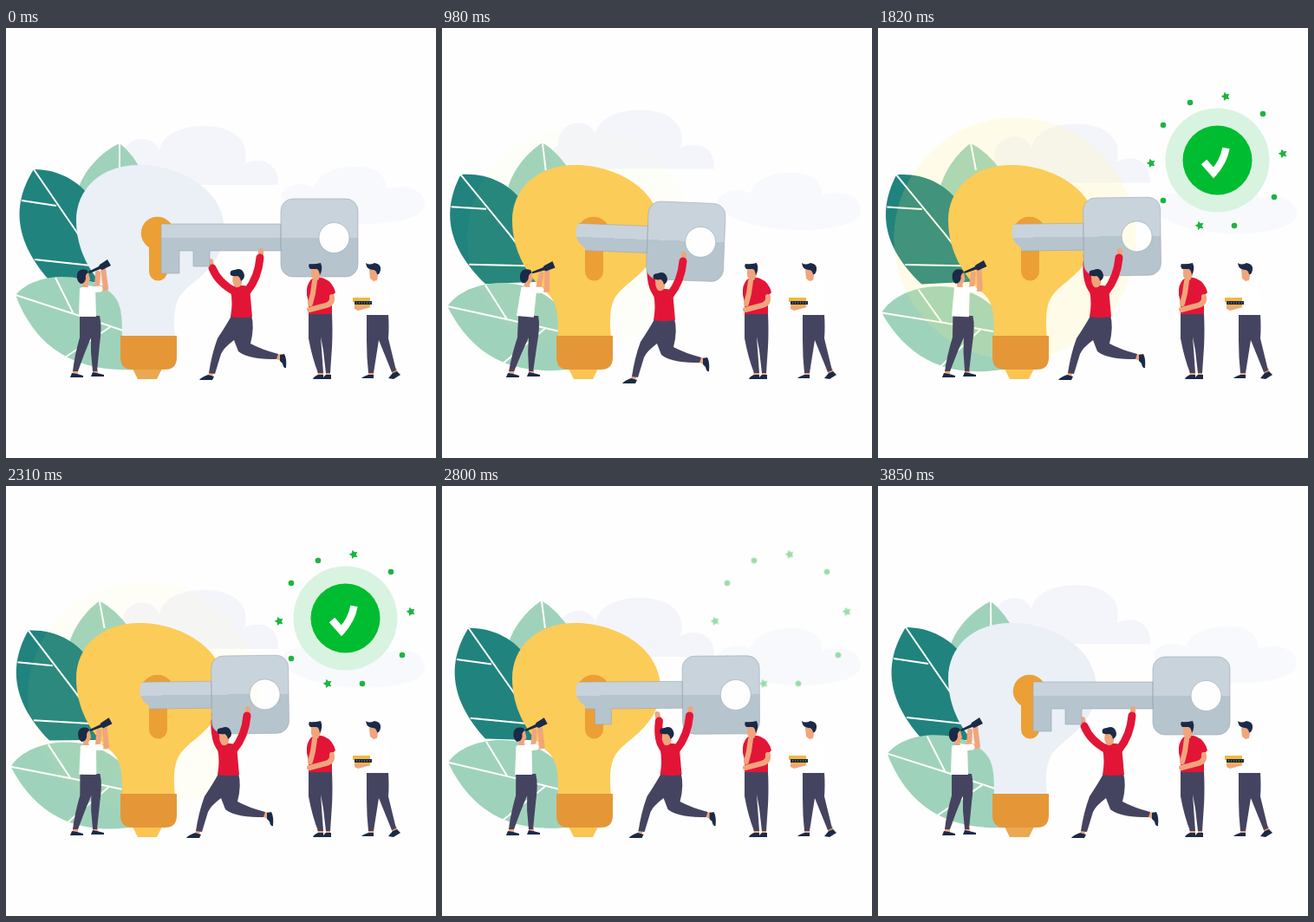
Recreate the animation shown at these times as an HTML page. Size 496 by 496 pixels, loop 3920 ms.

```html
<!DOCTYPE html>
<html lang="en">
<head>
<meta charset="utf-8">
<title>Key to the idea</title>
<style>
  html, body { margin: 0; width: 100%; height: 100%; overflow: hidden; background: #fefefe; }
  svg { display: block; width: 100vw; height: 100vh; }
  .skin { fill: #f0a57c; }
  .dark { fill: #1b2a47; }
  .pants { fill: #454460; }
  .red { fill: #e31536; }
  .white { fill: #fff; }
  .light { fill: #9fd2bb; }
  .teal { fill: #21837d; }
  .line { fill: none; stroke-linecap: round; stroke-linejoin: round; }
  .rib { fill: none; stroke: #fff; stroke-width: 2; }
  .sleeve { stroke: #e31536; stroke-width: 9; }
  .arm { stroke: #f0a57c; stroke-width: 6; }
</style>
</head>
<body>
<svg viewBox="0 0 496 496">
  <defs>
    <linearGradient id="steel" gradientUnits="userSpaceOnUse" x1="0" y1="197" x2="0" y2="287">
      <stop offset=".495" stop-color="#c9d3dc"/>
      <stop offset=".495" stop-color="#b6c4ce"/>
    </linearGradient>
    <clipPath id="slot"><path d="M175 217A19 19 0 0 0 165 253V400H500V100H175Z"/></clipPath>
  </defs>

  <path id="cloudL" fill="#f4f5fb" d="M314 181C315 165 305 153 292 153Q281 153 275 157C283 130 262 113 228 113C200 113 180 124 177 141C172 129 160 126 150 129C138 133 134 142 134 154Q122 160 122 181Z"/>
  <path id="cloudR" fill="#f8f9fc" d="M317 192C325 178 345 178 355 184C362 165 385 160 405 160C428 160 440 172 438 186C465 178 483 188 483 204C483 218 450 226 415 226C370 226 322 215 317 192Z"/>

  <g id="leafTop">
    <path class="light" d="M131 133C110 143 88 165 82 190L85 260H160V172Q148 146 131 133Z"/>
    <path class="rib" d="M131 133V165"/>
  </g>
  <g id="leafDark">
    <path class="teal" d="M32 163C62 163 85 178 97 195L130 240L125 294L50 291C5 240 10 198 32 163Z"/>
    <path class="rib" d="M32 163L82 236L105 272M18 199L58 205M33 267L98 274"/>
  </g>
  <g id="leafLow">
    <path class="light" d="M11 308C30 285 75 280 110 297Q145 315 160 360L150 394C100 396 40 385 11 308Z"/>
    <path class="rib" d="M11 308L82 331L135 349M57 288L78 330M120 345L68 380"/>
  </g>
  <circle id="glow" cx="158" cy="243" fill="#ffee70"/>

  <path id="bulb" d="M154 158C200 158 252 186 252 233C252 272 218 290 205 304C193 316 193 334 195 356H134C134 328 133 315 119 304C98 285 81 256 81 222C81 186 109 158 154 158Z"/>
  <path id="tip" d="M146 393H180L174 405H152Z"/>
  <path fill="#e59738" d="M132 355H197V380Q197 394 183 394H146Q132 394 132 380Z"/>
  <path fill="#ec9f35" d="M165 253A19 19 0 1 1 186 252V281a10.500 10.500 0 0 1-21 0Z"/>

  <g id="badge">
    <circle r="60" fill="#d9f3e1"/>
    <circle r="40" fill="#00bc30"/>
    <path fill="none" stroke="#fff" stroke-width="8.500" d="M-15.500 2L-4.500 14.500Q7 2 10-14"/>
  </g>
  <g id="sparks" fill="#1cb540"></g>

  <g id="armBack">
    <path id="hand" class="line arm"/>
    <path id="sleeve" class="line sleeve"/>
  </g>
  <g clip-path="url(#slot)">
    <path id="key" fill="url(#steel)" fill-rule="evenodd" stroke="#9da6b1" stroke-width=".6"
      d="M179 226H317V257H235V275H216V257H200V283H179ZM331 197H392a14 14 0 0 1 14 14V273a14 14 0 0 1-14 14H331a14 14 0 0 1-14-14V211a14 14 0 0 1 14-14ZM396 242a17.500 17.500 0 1 0-35 0a17.500 17.500 0 1 0 35 0Z"/>
  </g>

  <g id="carrier">
    <path class="skin" d="M234 397L239 398L238 403H233ZM311 377L318 376L317 384L312 382Z"/>
    <path class="pants" d="M260 332L283 331Q287 345 282 364Q295 371 314 376L312 382C295 382 278 381 268 373L263 360Q251 369 248 376L241 399L234 398C236 385 239 371 244 358Q254 343 260 332Z"/>
    <path class="dark" d="M233 400L240 402L238 406H223Q225 403 233 400ZM316 377L321 376Q324 381 323 392Q320 393 319 387L316 384Z"/>
    <path class="line arm" d="M294 268V257"/>
    <path class="line sleeve" d="M278 304Q291 288 293 265"/>
    <path class="red" d="M262 298Q272 295 281 299L284 333Q272 335 259 333Q262 317 259 303Z"/>
    <path class="skin" d="M262 285L271 284Q274 294 270 298Q265 301 263 297Q260 292 262 285Z"/>
    <path class="dark" d="M259 285Q257 279 264 279Q271 276 274 282Q277 288 271 292Q270 287 267 286Q262 287 259 285Z"/>
  </g>

  <g id="scout">
    <path class="skin" d="M77 394H83V400H77ZM100 394H106V400H100Z"/>
    <path class="pants" d="M85 332H108Q111 344 108 365L105 396H100L98 374L98 357Q90 376 83 396H77Q79 378 85 357Z"/>
    <g id="scoutTop">
      <path class="white" d="M85 300Q95 295 103 299L104 333H84Z"/>
      <path class="line arm" d="M103 301L115 300L112 277M105 298L106 283" stroke-width="5"/>
      <path class="line" stroke="#fff" stroke-width="7" d="M98 302L108 301"/>
      <path class="skin" d="M88 283L95 282L97 290L94 296L95 299H88Z"/>
      <path class="dark" d="M82 284Q84 277 93 279L95 282Q91 284 92 289Q91 295 86 295Q81 292 82 284Z"/>
      <path class="dark" d="M95 281L107 275L108 273L117 267L121 274L111 279L109 278L96 283Z"/>
    </g>
    <path class="dark" d="M76 398L82 399L89 401V403H74ZM100 397L105 398L113 400V402H98Z"/>
  </g>

  <g>
    <path class="skin" d="M359 396H366V402H360ZM369 396H374V402H369Z"/>
    <path class="pants" d="M349 329H376Q377 350 376 368L374 398H369L366 372L363 356L366 398H360Q353 380 349 358Z"/>
    <path class="dark" d="M360 400H366V405H354Q355 402 360 400ZM369 400H375V405H365Q366 402 369 400Z"/>
    <path class="red" d="M352 290Q360 286 367 289Q377 293 380 305L376 309L376 330H349Q350 318 347 308Q346 296 352 290Z"/>
    <path class="line arm" d="M376 310Q377 318 369 320L350 325"/>
    <path class="line arm" d="M351 318L354 306L356 292"/>
    <path class="skin" d="M352 277L362 276L363 285L360 291H355L352 286Z"/>
    <path class="dark" d="M350 272Q355 273 363 271Q366 278 362 285Q361 278 358 278H351Q348 275 350 272Z"/>
  </g>

  <g>
    <path class="skin" d="M418 396H424V402H418ZM444 394L450 392L452 398L446 400Z"/>
    <path class="pants" d="M416 330H441Q442 346 441 358L450 395L445 397L430 360L424 398H418Q416 380 416 360Z"/>
    <path class="dark" d="M418 400H424V404H410Q412 402 418 400ZM446 398L451 396L455 400L447 405L441 404Z"/>
    <path class="white" d="M419 294Q430 288 438 296Q443 308 441 331H416Z"/>
    <path class="skin" d="M419 279L428 278L429 285L428 291L424 292L420 289Z"/>
    <path class="dark" d="M415 271Q419 274 425 271Q433 272 432 279Q431 285 428 284Q427 279 423 279Q416 279 415 271Z"/>
    <path class="skin" d="M402 320H417L421 322L406 326L402 324Z"/>
    <path fill="#f3b73c" d="M400 311H420V321H402L403 316H400Z"/>
    <path class="dark" d="M402 315H422V319H402Z"/>
    <path fill="none" stroke="#d8dde6" stroke-width=".7" stroke-dasharray="1 2" d="M404 317H421"/>
  </g>
</svg>
<script>
const LOOP = 3920;
const el = Object.fromEntries([...document.querySelectorAll('svg [id]')].map(n => [n.id, n]));
const set = (name, attrs) => { for (const a in attrs) el[name].setAttribute(a, attrs[a]); };
const move = (name, transform) => set(name, { transform });

const star = Array.from({ length: 10 }, (_, i) => {
  const a = i * Math.PI / 5 - 1.85, r = i % 2 ? 2.8 : 5.4;
  return `${r * Math.cos(a)},${r * Math.sin(a)}`;
}).join(' ');
const dots = [[360, 86], [444, 99], [457, 195], [411, 228], [329, 199], [329, 112]];
const stars = [[401, 79], [467, 145], [371, 228], [315, 156]];
const at = ([x, y]) => `transform="translate(${x - 391.5} ${y - 152.5})"`;
el.sparks.innerHTML = dots.map(p => `<circle r="3.3" ${at(p)}/>`).join('')
  + stars.map(p => `<polygon points="${star}" ${at(p)}/>`).join('');

// Linear interpolation through [time, value] pairs
function track(t, ...keys) {
  if (t <= keys[0][0]) return keys[0][1];
  for (let i = 1; i < keys.length; i++) {
    const [t0, v0] = keys[i - 1], [t1, v1] = keys[i];
    if (t < t1) return v0 + (v1 - v0) * (t - t0) / (t1 - t0);
  }
  return keys[keys.length - 1][1];
}
const ramp = (t, from, to) => track(t, [from, 0], [to, 1]);
const smooth = x => (1 - Math.cos(Math.PI * x)) / 2;
const triangle = x => 1 - Math.abs(2 * (x - Math.floor(x)) - 1);
const backOut = x => 1 + 2.7 * (x - 1) ** 3 + 1.7 * (x - 1) ** 2;
const mix = (a, b, k) => `rgb(${a.map((v, i) => Math.round(v + (b[i] - v) * k))})`;

function draw(t) {
  move('cloudL', `translate(0 ${18.5 - 37 * triangle(t / LOOP + .25)})`);
  move('cloudR', `translate(0 ${14 * triangle(3 * t / LOOP)})`);
  move('leafTop', `rotate(${track(t, [0, 0], [1560, -10.8], [2250, -10.8], [LOOP, 0])} 117 260)`);
  move('leafDark', `rotate(${track(t, [0, 0], [1400, -6.9], [2950, 0])} 100 290)`);
  move('leafLow', `rotate(${track(t, [0, 0], [1650, -9.6], [LOOP, 0])} 140 362)`);

  const lit = ramp(t, 600, 900) - ramp(t, 2950, 3300);
  set('bulb', { fill: mix([234, 240, 245], [251, 204, 88], lit) });
  set('tip', { fill: mix([235, 168, 80], [252, 197, 82], lit) });
  set('glow', {
    r: track(t, [600, 122], [980, 129], [1800, 140], [2310, 133], [2600, 128]),
    opacity: track(t, [600, 0], [980, .03], [1700, .17], [2310, .05], [2600, 0])
  });

  const inserted = smooth(ramp(t, 0, 485)) - smooth(ramp(t, 2550, 3050));
  const tilt = track(t, [440, 0], [770, 5], [1300, 0]);
  move('key', `rotate(${tilt - .75 * inserted} 175 238) translate(${-80 * inserted} 0)`);

  const carried = `translate(${-15 * inserted} ${1.35 * tilt})`;
  move('carrier', carried);
  move('armBack', carried);
  const x = track(inserted, [0, 236], [.5, 256], [1, 254]);
  const y = track(inserted, [0, 269], [.5, 263]);
  const elbow = 245 + 10 * Math.min(1, 2 * inserted);
  set('hand', { d: `M${x} ${y}l1 6` });
  set('sleeve', { d: `M${x + 2} ${y + 8}Q${elbow} 294 264 304` });

  const lean = track(t, [0, 0], [980, 1], [2400, .1], [3850, 0]);
  move('scout', `translate(0 400) skewX(${-2.6 * lean}) translate(0 -400)`);
  move('scoutTop', `rotate(${5 * lean} 95 320)`);

  const pop = backOut(ramp(t, 990, 1270));
  const leave = smooth(ramp(t, 2400, 2720));
  const center = 'translate(391.5 152.5)';
  move('badge', `${center} scale(${t < 990 ? 0 : pop * (1 - leave)})`);
  move('sparks', `${center} scale(${t < 990 ? 0 : backOut(ramp(t, 990, 1220))})`);
  set('sparks', { opacity: 1 - ramp(t, 2480, 3060) });
}

(function frame() {
  draw(performance.now() % LOOP);
  requestAnimationFrame(frame);
})();
</script>
</body>
</html>
```
